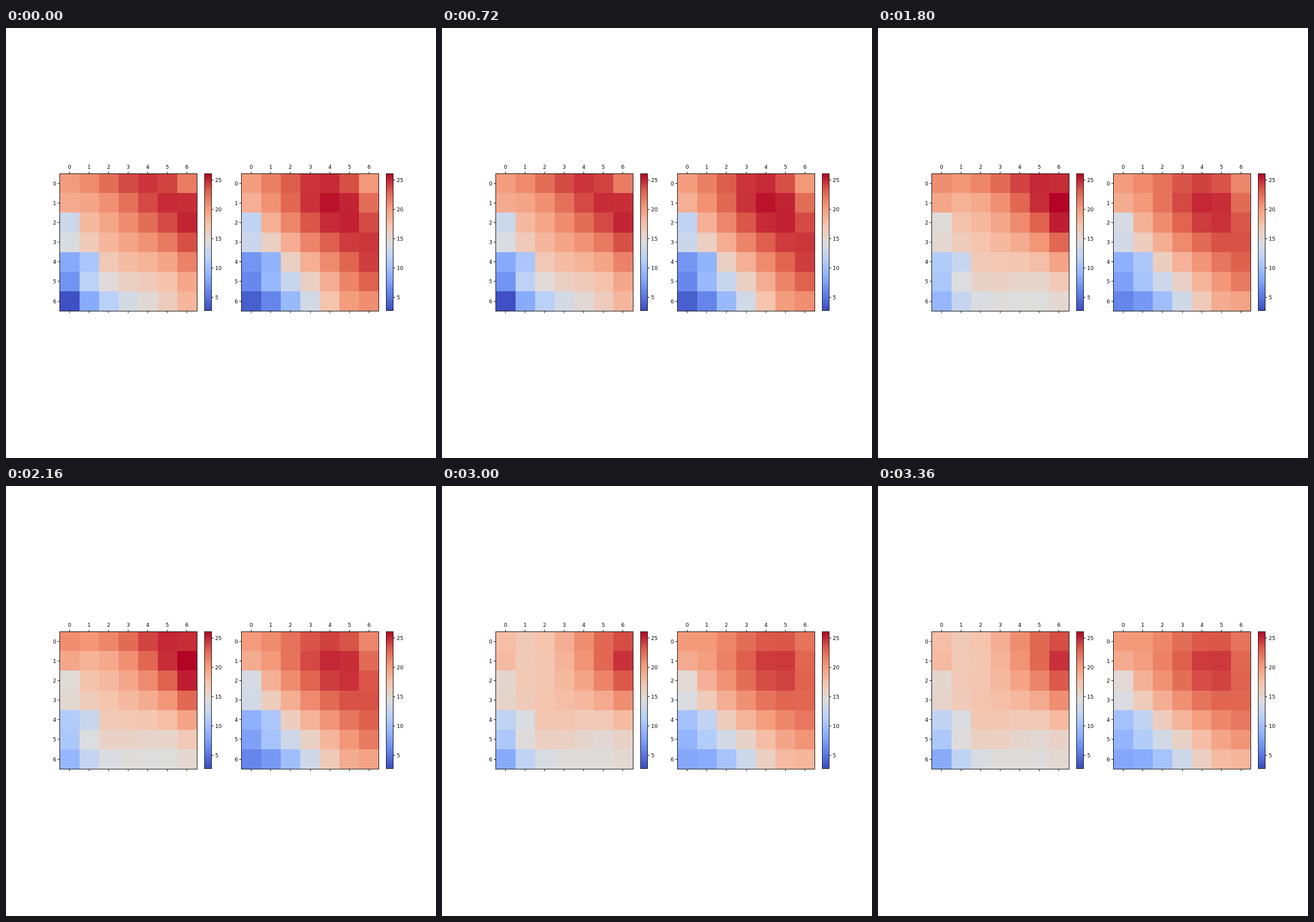
These frames come from a looping animation (748x748 px, 3.6 s). An HTML page with a canvas:

```html
<!DOCTYPE html>
<html lang="en">
<head>
<meta charset="utf-8">
<title>Heat maps</title>
<style>
html, body { margin: 0; width: 100%; height: 100%; overflow: hidden; background: #fff; }
canvas { display: block; }
</style>
</head>
<body>
<canvas id="stage" width="748" height="748"></canvas>
<script>
const ctx = document.getElementById('stage').getContext('2d');
const N = 7, TOP = 253.2, SIZE = 238.4, HEIGHT = 238.9, LOW = 2.8, HIGH = 26;

// Cool-to-warm colour ramp, evenly spaced stops
const RAMP = ['#3b4cc0', '#6282ea', '#8db0fe', '#b8d0f9', '#dddddd', '#f5c4ad', '#f49a7b', '#de604d', '#b40426']
  .map(hex => [1, 3, 5].map(i => parseInt(hex.slice(i, i + 2), 16)));

// Each sheet is a smooth surface through evenly spaced key points
const left = {
  base: [[20, 22.4, 24.5, 21.7], [17, 19.4, 22.4, 25], [10.6, 16.8, 18.5, 21.4], [3, 11.6, 15, 18.3]],
  drift: [
    [[0]],
    [[-1.4, -0.6, 2.6], [0.8, -0.9, -0.1], [3.8, 0.5, -1.2]],
    [[0.8, -1.2, 3], [1, -1.4, -0.9], [6.2, 0.9, -3.1]],
    [[-1.2, -2.8, 2.9], [0.4, -2.5, -1.6], [5.7, 0.2, -3.3]],
    [[-2.3, -4.9, 2], [1.4, -1.8, -2.8], [5.2, 1, -3.2]]
  ]
};
const right = {
  base: [[20, 23.2, 24.8, 20.3], [16.2, 21.2, 24.8, 23.8], [9.3, 16, 21, 24.2], [3.8, 9.4, 17.3, 20.8]],
  drift: [[0.2, -2.1, 1.8], [1.2, -0.6, -1.7], [4.2, -0.3, -2.5]]
};

// Cool cells that fade as the maps even out
const coolSpots = [{ row: 2, col: 0, depth: 4 }, { row: 4, col: 0, depth: 2.4 }, { row: 4, col: 1, depth: 4 }];

const snap = v => Math.floor(v) + 0.5;

// Lagrange polynomial through evenly spaced points, t from 0 to 1
function curve(points, t) {
  const x = t * (points.length - 1);
  return points.reduce((sum, p, i) =>
    sum + points.reduce((term, _, j) => j === i ? term : term * (x - j) / (i - j), p), 0);
}

const sheet = (rows, u, v) => curve(rows.map(row => curve(row, u)), v);

function cooling(row, col, step) {
  const spot = coolSpots.find(s => s.row === row && s.col === col);
  return spot ? spot.depth * 0.83 ** step : 0;
}

function heat(value) {
  const t = Math.min(1, Math.max(0, (value - LOW) / (HIGH - LOW))) * (RAMP.length - 1);
  const i = Math.min(RAMP.length - 2, Math.floor(t));
  return `rgb(${RAMP[i].map((c, k) => Math.round(c + (RAMP[i + 1][k] - c) * (t - i)))})`;
}

function line(x1, y1, x2, y2) {
  ctx.beginPath();
  ctx.moveTo(x1, y1);
  ctx.lineTo(x2, y2);
  ctx.stroke();
}

function label(text, x, y, align) {
  ctx.fillStyle = '#000';
  ctx.textAlign = align;
  ctx.fillText(text, x, y);
}

function frame(x, y, w, h) {
  const x1 = snap(x), y1 = snap(y);
  ctx.strokeRect(x1, y1, snap(x + w) - x1, snap(y + h) - y1);
}

function drawCells(x, drift, amount, base, step) {
  const colEdge = i => Math.round(x + i * SIZE / N);
  const rowEdge = i => Math.round(TOP + i * HEIGHT / N);
  for (let row = 0; row < N; row++) {
    for (let col = 0; col < N; col++) {
      const u = col / (N - 1), v = row / (N - 1);
      ctx.fillStyle = heat(sheet(base, u, v) + amount * sheet(drift, u, v) - cooling(row, col, step));
      ctx.fillRect(colEdge(col), rowEdge(row),
        colEdge(col + 1) - colEdge(col), rowEdge(row + 1) - rowEdge(row));
    }
  }
}

function drawAxes(x) {
  const x1 = snap(x), y1 = snap(TOP), y2 = snap(TOP + HEIGHT);
  frame(x, TOP, SIZE, HEIGHT);
  for (let i = 0; i < N; i++) {
    const tx = snap(x + (i + 0.5) * SIZE / N), ty = snap(TOP + (i + 0.5) * HEIGHT / N);
    line(tx, y1 - 3.5, tx, y1);
    line(tx, y2, tx, y2 + 3.5);
    line(x1 - 3.5, ty, x1, ty);
    label(i, tx, 245.2, 'center');
    label(i, x1 - 6, ty + 3.3, 'right');
  }
}

function drawBar(x) {
  const y = 253.6, w = 11.6, h = 237.6, edge = snap(x + w);
  const fade = ctx.createLinearGradient(0, y + h, 0, y);
  RAMP.forEach((c, i) => fade.addColorStop(i / (RAMP.length - 1), `rgb(${c})`));
  ctx.fillStyle = fade;
  ctx.fillRect(x, y, w, h);
  frame(x, y, w, h);
  for (let v = 5; v <= 25; v += 5) {
    const ty = snap(264.3 + (25 - v) * 10.2);
    line(edge, ty, edge + 3.5, ty);
    label(v, edge + 6.3, ty + 3.5, 'left');
  }
}

function drawPanel(x, base, drift, amount, step) {
  drawCells(x, drift, amount, base, step);
  drawAxes(x);
  drawBar(x + 252);
}

function draw(now) {
  const t = now % 3600;
  const step = t < 1200 ? 0 : Math.floor((t - 600) / 600);
  ctx.fillStyle = '#fff';
  ctx.fillRect(0, 0, 748, 748);
  ctx.strokeStyle = '#000';
  ctx.lineWidth = 0.9;
  ctx.font = '9px "DejaVu Sans", sans-serif';
  drawPanel(93.6, left.base, left.drift[step], 1, step);
  drawPanel(409.8, right.base, right.drift, step / 4, step);
}

const start = performance.now();
function tick() {
  draw(performance.now() - start);
  requestAnimationFrame(tick);
}
tick();
</script>
</body>
</html>
```
